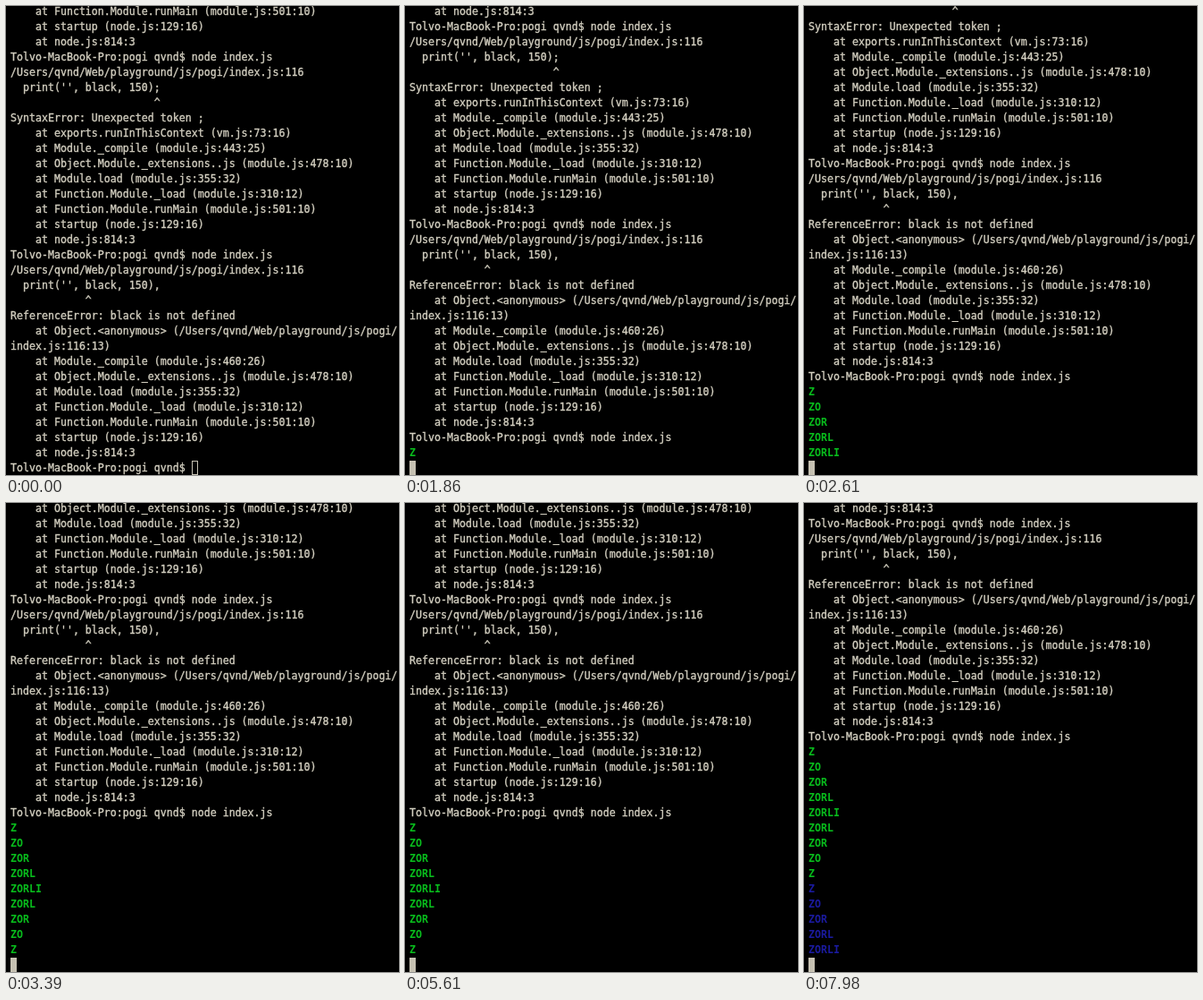
Write an HTML page that moves like this. It is 440 px wide and 524 px high and loops after 8000 ms.

```html
<!DOCTYPE html>
<html lang="en">
<head>
<meta charset="utf-8">
<title>Terminal</title>
<style>
  html, body { margin: 0; width: 100%; height: 100%; overflow: hidden; background: #000; }
  #stage { position: relative; width: 440px; height: 524px; overflow: hidden; background: #000; }
  #screen {
    position: absolute; left: 5px; bottom: -1px; margin: 0;
    font: 11.628px/17px "DejaVu Sans Mono", monospace;
    font-variant-ligatures: none;
    -webkit-text-stroke: 0.35px currentColor;
    color: #d3cfc0; white-space: pre;
  }
  #screen div { height: 17px; }
  .green, .blue { font-weight: bold; -webkit-text-stroke-width: 0; }
  .green { color: #08bc1c; }
  .blue { color: #1a1a9e; }
  #cursor {
    position: absolute; top: 508px; width: 7px; height: 16px;
    box-sizing: border-box; border: 1px solid #c6c1b2;
  }
  #cursor.solid { background: #c6c1b2; }
</style>
</head>
<body>
<div id="stage"><pre id="screen"></pre><div id="cursor"></div></div>
<script>
const LOOP = 8000, CELL = 7, LEFT = 5;
const FOCUS_AT = 600, RECALL_AT = 950, ENTER_AT = 1480;
const PROMPT = 'Tolvo-MacBook-Pro:pogi qvnd$ ';
const COMMAND = 'node index.js';
const FOLDER = '/Users/qvnd/Web/playground/js/pogi/';
const WORD = 'ZORLI';

const screen = document.getElementById('screen');
const cursor = document.getElementById('cursor');

const at = place => '    at ' + place;
const exit = [
  at('Function.Module.runMain (module.js:501:10)'),
  at('startup (node.js:129:16)'),
  at('node.js:814:3')
];
const trace = compiled => [
  at(`Module._compile (module.js:${compiled})`),
  at('Object.Module._extensions..js (module.js:478:10)'),
  at('Module.load (module.js:355:32)'),
  at('Function.Module._load (module.js:310:12)'),
  ...exit
];
const failure = (end, caret, message) => [
  PROMPT + COMMAND,
  FOLDER + 'index.js:116',
  "  print('', black, 150)" + end,
  ' '.repeat(caret) + '^',
  message
];
const history = [
  ...exit,
  ...failure(';', 23, 'SyntaxError: Unexpected token ;'),
  at('exports.runInThisContext (vm.js:73:16)'),
  ...trace('443:25'),
  ...failure(',', 12, 'ReferenceError: black is not defined'),
  at(`Object.<anonymous> (${FOLDER}`),
  'index.js:116:13)',
  ...trace('460:26')
];

// Each run prints one prefix of the word per interval.
const runs = [
  { color: 'green', start: 1725, every: 200, lengths: [1, 2, 3, 4, 5, 4, 3, 2, 1] },
  { color: 'blue', start: 6050, every: 425, lengths: [1, 2, 3, 4, 5] }
];

function addLine(text, color = '') {
  const line = document.createElement('div');
  line.textContent = text;
  line.className = color;
  screen.append(line);
}

function printed(run, time) {
  const count = Math.floor((time - run.start) / run.every) + 1;
  return run.lengths.slice(0, Math.max(0, count));
}

let shown = '';
function draw(time) {
  const entered = time >= ENTER_AT;
  const input = PROMPT + (time >= RECALL_AT ? COMMAND : '');
  const output = runs.map(run => printed(run, time));
  const state = [time >= FOCUS_AT, input, entered, ...output.map(o => o.length)].join();
  if (state === shown) return;
  shown = state;

  screen.replaceChildren();
  history.forEach(text => addLine(text));
  addLine(input);
  output.forEach((lengths, i) =>
    lengths.forEach(n => addLine(WORD.slice(0, n), runs[i].color)));
  if (entered) addLine('');

  cursor.className = time >= FOCUS_AT ? 'solid' : '';
  cursor.style.left = LEFT + CELL * (entered ? 0 : input.length) + 'px';
}

const start = performance.now();
function tick() {
  draw((performance.now() - start) % LOOP);
  requestAnimationFrame(tick);
}
tick();
</script>
</body>
</html>
```
